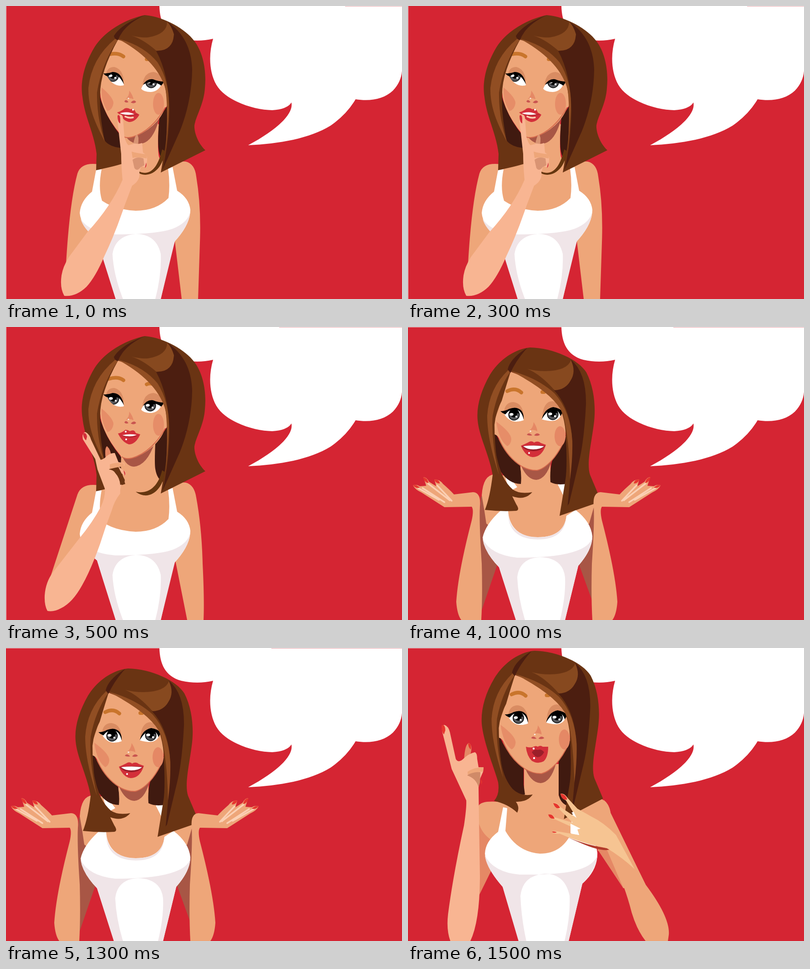
Write an HTML page that moves like this. It is 870 px wide and 644 px high and loops after 2 s.

```html
<!DOCTYPE html>
<html lang="en">
<head>
<meta charset="utf-8">
<title>Thinking woman</title>
<style>
html, body { margin: 0; width: 100%; height: 100%; overflow: hidden; background: #d52533; }
svg { display: block; width: 100%; height: 100%; }
.pose { visibility: hidden; animation: show 2s step-end infinite; animation-delay: calc(var(--i) * .5s - 2s); }
@keyframes show { 0% { visibility: visible; } 25%, 100% { visibility: hidden; } }
.white { fill: #fff; }
.shade { fill: #f0e5e8; }
.skin { fill: #eea679; }
.pale { fill: #f8b592; }
.cream { fill: #f6c492; }
.blush { fill: #e58865; }
.lid { fill: #d98c62; }
.neck { fill: #a85645; }
.hair { fill: #6a3413; }
.glow { fill: #87491f; }
.lock { fill: #914e23; }
.dark { fill: #4c1e10; }
.deep { fill: #401a10; }
.red { fill: #d32f39; }
.wine { fill: #9b1f2a; }
.nail { fill: #e6352e; }
.ink { fill: #000; }
.brow { fill: none; stroke: #c9752c; stroke-width: 8; stroke-linecap: round; }
.jaw { fill: none; stroke: #d56a4d; stroke-width: 2; }
.crease { fill: none; stroke: #fbd0b4; stroke-width: 3.5; stroke-linecap: round; }
</style>
</head>
<body>
<svg viewBox="0 0 870 644" preserveAspectRatio="none">
<defs>
  <g id="iris">
    <circle r="12.5" class="ink"/><circle r="11" fill="#55565a"/>
    <circle r="6.8" cy="-1" class="ink"/>
    <path d="M-11,-3A11,11 0 0 1 11,-3Z" class="ink"/>
    <ellipse cx="-5.5" cy="-1" rx="4.2" ry="3" class="white"/><circle cx="5" cy="4" r="2.2" class="white"/>
  </g>
  <path id="al" d="M221,151Q231,147 243,148Q256,155 259,174C246,178 230,172 221,151Z"/>
  <path id="ar" d="M297,182Q303,166 319,162Q337,164 342,171Q335,188 318,189Q303,189 297,182Z"/>
  <path id="bl" d="M212,192Q223,178 242,180Q254,189 254,205Q226,215 212,192Z"/>
  <path id="br" d="M294,203Q301,183 318,179Q334,182 336,194Q328,213 294,203Z"/>
  <clipPath id="aEyes"><use href="#al"/><use href="#ar"/></clipPath>
  <clipPath id="bEyes"><use href="#bl"/><use href="#br"/></clipPath>

  <!-- tilted head -->
  <g id="faceA">
    <path class="skin" d="M246,72Q222,105 212,140Q204,170 208,200Q215,238 252,283Q264,293 286,286Q318,272 336,248Q346,235 349,223Q355,224 355,205L350,150L318,100Z"/>
    <path class="jaw" d="M254,285Q266,294 288,284Q324,268 349,224"/>
    <path class="blush" opacity=".8" d="M210,179Q237,202 236,214Q234,228 223,231Q208,208 210,179Z"/>
    <ellipse class="blush" opacity=".8" cx="335" cy="215" rx="12" ry="24"/>
    <path class="lid" d="M220,150Q222,134 238,134Q256,138 259,165ZM300,173Q303,146 324,145Q342,148 345,168Z"/>
    <path class="blush" d="M262,205Q271,199 271,186Q279,197 280,205Q271,200 262,205Z"/>
    <circle class="white" cx="269" cy="203" r="1.6" opacity=".8"/>
    <path fill="#c95550" d="M260,210Q263,203 269,211Q264,214 260,210ZM286,211Q282,204 274,212Q281,216 286,211Z"/>
    <use href="#al" class="white"/><use href="#ar" class="white"/>
  </g>
  <path id="lashA" class="ink" d="M214,148Q224,149 234,145Q254,145 259,172Q250,153 238,150Q229,149 224,155Q217,153 214,148ZM301,173Q310,159 323,161Q334,166 348,166L341,175Q323,161 301,173Z"/>
  <g id="hairA">
    <path class="hair" d="M305,20C265,28 215,55 193,93C170,132 163,170 168,200C173,245 194,280 199,325L198,361Q240,352 262,345Q255,325 252,305Q215,290 207,200Q204,150 246,74Z"/>
    <path class="deep" d="M204,190Q215,240 253,286L252,312Q227,309 217,296Q203,250 204,190Z"/>
    <path class="lock" d="M240,72Q188,115 181,180C180,230 203,270 217,298Q197,220 208,160Q218,115 246,74Z"/>
    <path class="hair" d="M246,74Q209,130 200,190Q199,245 217,298Q204,235 207,190Q205,140 246,74Z"/>
    <path class="hair" d="M246,74Q305,92 331,128Q354,170 355,230Q355,290 346,330L340,366L438,317C420,300 413,275 414,262C418,240 435,215 437,180C441,140 432,100 413,76C395,52 350,24 305,20Q255,42 238,68Z"/>
    <path class="dark" d="M355,35Q407,70 409,140Q408,210 382,275L344,360Q358,300 359,230Q358,150 330,99Q372,95 368,60Z"/>
    <path class="glow" d="M275,65Q300,72 330,98Q366,100 369,62Q363,42 354,35Q354,62 312,69Q295,70 275,65Z"/>
    <path class="lock" d="M246,72Q302,86 333,124Q359,165 358,222Q356,275 350,325Q357,240 351,185Q334,120 246,72Z"/>
    <path class="dark" d="M305,20Q252,40 237,66Q239,74 246,75Q258,42 305,20Z"/>
  </g>
  <path id="shirtA" class="white" d="M198,360L189,408Q164,428 162,455Q165,485 200,513L213,555L241,644H340L366,530L371,517Q405,480 405,448Q402,422 376,406L366,354L356,356Q361,392 357,422Q330,450 285,450Q240,448 211,428Q202,400 210,359Z"/>
  <path id="shadeA" class="shade" d="M164,468Q182,497 240,502Q330,502 365,490Q397,478 404,455Q402,483 371,517L340,644H328Q342,590 340,545Q330,501 285,501Q240,505 234,545Q236,590 257,644H241L200,513Q170,490 164,468Z"/>
  <path id="chestA" class="skin" d="M252,270L300,245H334V325Q337,345 366,345L374,420L330,465H230L190,425L205,348L252,330Z"/>

  <!-- upright head -->
  <g id="faceB">
    <path class="neck" d="M245,295Q258,335 282,336Q304,334 315,295Z"/>
    <path class="skin" d="M225,98Q213,135 205,160Q190,188 188,212L190,236Q198,238 201,248Q217,285 248,305Q268,316 284,315Q302,311 322,286Q340,262 346,240V190L325,135Z"/>
    <path class="jaw" d="M200,246Q217,285 248,305Q266,316 284,315Q302,311 322,286Q340,262 346,240"/>
    <path class="blush" opacity=".8" d="M194,208Q227,232 227,247Q226,258 218,262Q199,248 194,208Z"/>
    <ellipse class="blush" cx="334" cy="240" rx="12" ry="22"/>
    <path class="lid" d="M211,185Q214,165 232,165Q252,168 254,195ZM295,198Q297,164 317,163Q331,165 336,185Z"/>
    <path class="blush" d="M266,228Q275,222 276,209Q284,221 284,229Q275,224 266,228Z"/>
    <circle class="white" cx="269" cy="229" r="1.8" opacity=".8"/>
    <path fill="#c95550" d="M261,237Q265,230 273,238Q267,240 261,237ZM290,237Q284,230 277,238Q284,241 290,237Z"/>
    <path class="brow" d="M218,141Q236,132 249,144M295,143H299"/>
    <use href="#bl" class="white"/><use href="#br" class="white"/>
    <g clip-path="url(#bEyes)"><use href="#iris" x="233" y="193"/><use href="#iris" x="318" y="192"/></g>
    <path class="ink" d="M203,185Q214,185 222,180Q240,173 250,185Q255,194 254,203Q250,185 238,181Q222,180 214,192Q208,190 203,185ZM294,203Q299,180 319,176Q334,178 340,187L335,196Q331,182 319,181Q304,184 294,203Z"/>
  </g>
  <g id="hairB">
    <path class="hair" d="M225,98Q290,122 320,152Q346,190 347,245Q350,310 346,335L333,415L419,370L400,325C392,300 402,260 408,215C413,180 410,135 392,100C375,72 320,46 268,45Q230,65 219,92Z"/>
    <path class="dark" d="M358,72Q392,100 391,170Q387,250 376,295L349,408Q361,300 360,240Q355,175 320,138Q360,130 363,95Z"/>
    <path class="glow" d="M262,92Q290,103 322,139Q346,138 357,118Q370,98 358,73Q350,96 302,97Q280,97 262,92Z"/>
    <path class="lock" d="M225,96Q285,112 322,146Q357,185 361,250Q362,290 356,335Q354,240 340,190Q320,145 225,96Z"/>
    <path class="dark" d="M262,46Q225,68 219,93L225,101Q238,72 262,46Z"/>
  </g>
  <g id="strandB">
    <path class="lock" d="M220,95Q178,135 174,195C174,240 188,290 200,325Q183,245 190,205Q206,160 225,100Z"/>
    <path class="hair" d="M225,98Q196,140 186,195Q182,250 200,325Q190,265 190,215Q193,185 206,162Z"/>
  </g>

  <g id="palmArm">
    <path class="skin" d="M140,395Q145,402 140,425Q110,540 106,604Q108,632 117,644H161Q164,590 162,520Q156,430 158,395Q161,364 143,363L101,368Q92,358 77,345Q70,335 58,335L62,350L46,340Q41,330 34,330L40,349L26,350Q18,345 11,348Q15,357 30,364L80,396Z"/>
    <path class="crease" d="M32,354L80,385M44,344L92,381M64,348L96,382M22,354L68,380"/>
    <path class="nail" d="M11,348Q18,345 26,353Q18,356 11,348ZM33,330Q43,331 45,343Q36,342 33,330ZM58,335Q69,335 70,344Q60,344 58,335Z"/>
  </g>
</defs>

<rect width="870" height="644" fill="#d52533"/>
<path class="white" d="M337,0C338,34 349,62 385,72Q420,80 455,72C445,105 446,145 462,173C482,208 545,229 585,229Q618,227 627,212C633,238 592,274 532,306C600,303 668,291 713,263Q749,238 768,205C800,210 830,205 850,186Q868,167 870,143V0Z"/>

<g class="pose" style="--i:0">
  <path d="M.5,0V644M745,.5H870" stroke="#eda6ac"/>
  <path class="skin" d="M205,348Q165,342 157,368Q140,430 132,565L190,490L225,400ZM356,345Q380,340 395,342Q415,347 418,375Q429,440 426,520L422,644H386L371,517L360,420Z"/>
  <use href="#chestA"/><path class="skin" d="M320,260H336Q331,320 338,340H320Z"/>
  <use href="#shirtA"/><use href="#shadeA"/>
  <path class="neck" d="M262,285Q275,306 300,302Q325,295 337,245Z"/>
  <path class="deep" d="M354,220L337,246Q332,300 336,320Q340,338 346,340Q356,290 354,220Z"/>
  <use href="#faceA"/>
  <g clip-path="url(#aEyes)"><use href="#iris" x="235" y="154"/><use href="#iris" x="319" y="168"/></g>
  <use href="#lashA"/>
  <path class="brow" d="M228,106Q246,102 258,111M309,117H312"/>
  <path class="red" d="M244,234Q254,231 261,225Q268,223 273,227Q282,224 285,234L293,239Q284,255 270,255Q258,252 253,241Z"/>
  <path class="white" d="M250,236Q268,230 282,238Q266,241 250,236Z"/>
  <path class="wine" d="M247,236Q266,243 292,237Q270,245 247,236Z"/>
  <path class="crease" d="M262,243Q270,247 279,245"/><circle class="white" cx="279" cy="228" r="2"/>
  <use href="#hairA"/>
  <path fill="#65360f" d="M293,364C317,374 334,355 343,315L348,318C348,353 320,380 293,368Z"/>
  <path class="pale" d="M128,637Q118,620 122,592Q125,573 138,552L178,498Q232,439 256,382Q253,350 253,325L246,262Q243,242 250,238Q257,239 257,247L260,287Q264,302 269,306L280,303Q284,283 288,283Q292,287 290,304L299,301L301,322L309,328Q312,341 307,355L297,352L293,365Q296,383 277,395L260,440Q240,500 216,550Q197,595 177,617Q153,640 128,637Z"/>
  <path fill="#d99473" d="M280,302Q284,282 288,283Q293,288 290,303ZM278,338Q288,330 302,335L304,350L296,354Q288,365 282,356Z"/>
  <path class="skin" d="M276,320Q290,324 310,326L309,335Q290,331 278,334Z"/>
  <path class="red" d="M245,241Q250,237 251,247V258Q245,256 245,241ZM308,344Q310,353 305,356Z"/>
</g>

<g class="pose" style="--i:1">
  <path d="M.5,0V644M600,.5H870" stroke="#eda6ac"/>
  <path class="skin" d="M205,348Q166,342 157,368L98,548L160,470L225,400ZM356,345Q380,340 395,342Q414,347 418,375Q430,440 432,520Q436,600 434,644H398L372,513L360,420Z"/>
  <use href="#chestA"/><use href="#shirtA"/><use href="#shadeA"/>
  <path class="neck" d="M255,283Q264,306 281,307Q311,304 328,250Z"/>
  <path class="deep" d="M354,220L328,257Q326,300 328,312Q332,336 346,340Q356,290 354,220Z"/>
  <use href="#faceA"/>
  <g clip-path="url(#aEyes)"><use href="#iris" x="236" y="158"/><use href="#iris" x="317" y="173"/></g>
  <use href="#lashA"/>
  <path class="brow" d="M226,114Q246,108 258,117M309,126Q317,122 326,127"/>
  <path class="red" d="M246,234Q256,232 262,226Q268,226 272,229Q282,224 285,233L295,236Q285,258 270,258Q256,254 246,234Z"/>
  <path class="white" d="M255,238Q270,234 287,237Q274,243 255,238Z"/>
  <path class="wine" d="M248,235Q269,246 294,237Q271,249 248,235Z"/>
  <circle class="white" cx="263" cy="230" r="2"/><circle class="white" cx="264" cy="247" r="2"/>
  <use href="#hairA"/>
  <path fill="#65360f" d="M285,362C312,368 334,352 343,315L348,318C348,353 316,386 285,362Z"/>
  <path class="blush" d="M219,290Q216,265 222,262Q231,270 231,286Z"/>
  <path class="pale" d="M91,624Q84,612 85,590Q87,560 104,538L160,466Q190,430 209,394Q219,372 217,355L201,313L196,290L169,247Q166,232 175,231Q184,236 187,248L208,292Q216,290 222,283Q231,276 239,277L247,297L260,299V305L246,306L262,318L263,327L250,320L256,342Q250,352 251,366Q238,382 232,404Q218,440 207,476Q186,535 167,568Q146,606 121,618Q105,627 91,624Z"/>
  <path class="hair" d="M226,313Q239,305 247,308L261,336Q261,345 251,347Q250,332 240,321Q236,314 226,313Z"/>
  <path class="skin" d="M228,302Q243,296 259,300V306Q244,308 228,312Z"/>
  <path class="red" d="M169,234Q176,230 178,241L176,249Q170,245 169,234ZM258,315Q264,320 261,327Z"/>
</g>

<g class="pose" style="--i:2">
  <path d="M0,.5H337M583,.5H870" stroke="#e9a0a6"/>
  <path class="neck" d="M160,372L205,400L197,520L162,622L156,430ZM408,380L370,400L375,520L404,600L411,430Z"/>
  <path class="skin" d="M247,290V330L190,324Q165,325 162,370L168,405L172,432L230,475H340L398,432L410,390Q414,335 395,328L313,330V290Z"/>
  <path class="white" d="M214,330L228,336L240,352L222,362ZM348,332L329,346L342,372Z"/>
  <path class="white" d="M203,404Q170,434 164,463Q168,495 200,528L237,644H345L374,525Q405,490 405,460Q402,428 368,402L348,415C345,445 325,462 285,462C245,462 222,440 220,404Z"/>
  <path class="shade" d="M220,410C222,440 245,462 285,462C325,462 345,445 348,415C346,450 325,467 285,467C242,467 220,445 220,410Z"/>
  <path class="shade" d="M164,466Q182,501 240,507Q330,507 370,492Q399,482 405,463Q402,492 374,525L345,644H334Q347,590 345,550Q340,507 290,506Q245,508 240,550Q242,595 257,644H237L200,528Q168,495 164,466Z"/>
  <path class="deep" d="M190,225Q205,270 246,304Q250,325 248,345Q222,345 204,318Q187,275 190,225ZM348,235Q336,270 317,293Q311,315 313,341Q328,349 352,344Z"/>
  <use href="#faceB"/>
  <path class="red" d="M248,261Q260,256 267,252Q273,250 277,254Q285,249 292,255L303,259Q294,286 274,286Q258,285 248,261Z"/>
  <path class="wine" d="M250,262Q275,258 301,261Q293,273 275,273Q258,272 250,262Z"/>
  <path class="white" d="M253,262Q276,259 299,262Q291,269 275,269Q261,269 253,262Z"/>
  <circle class="white" cx="266" cy="277" r="2"/>
  <path class="hair" d="M268,45C235,48 200,72 180,105C160,140 150,175 153,205C156,240 178,280 186,325Q180,375 169,402Q205,406 238,404Q246,402 238,390L229,372Q257,382 273,363Q245,368 230,357Q205,335 196,290Q188,260 189,225Q188,200 205,160L225,98Z"/>
  <use href="#strandB"/>
  <use href="#hairB"/>
  <path class="hair" d="M333,415L411,388L421,366L360,380Z"/>
  <use href="#palmArm"/>
  <use href="#palmArm" transform="matrix(-1 0 0 1 566 0)"/>
</g>

<g class="pose" style="--i:3">
  <path d="M0,.5H337" stroke="#e9a0a6"/>
  <path class="skin" d="M255,255V322L200,338Q160,335 155,347V460H190L230,475H340L400,430L425,440L445,362Q442,340 425,332L331,325V255Z"/>
  <path class="blush" d="M155,383Q162,408 183,422L185,485L156,544ZM443,360L522,520L498,490L416,445Q442,400 443,360ZM416,442L440,446L473,528Z"/>
  <path class="skin" d="M430,334Q441,342 445,362L522,520L473,528L425,415Z"/>
  <path class="white" d="M209,350L198,404Q170,425 169,452Q172,484 208,525L243,644H353L383,518Q417,488 416,450Q412,418 385,403L366,352L357,358L361,402Q340,452 290,452Q240,448 214,402L218,352Z"/>
  <path class="shade" d="M169,456Q188,493 245,498Q340,499 375,487Q408,477 416,456Q412,490 383,518L353,644H344Q357,590 355,545Q345,496 300,496Q252,500 247,545Q249,595 260,644H243L208,525Q172,484 169,456Z"/>
  <path class="deep" d="M200,190Q215,232 254,264V300L257,322Q232,330 212,293Q196,245 200,190ZM357,195Q346,230 331,248V322Q335,345 360,350Z"/>
  <g transform="translate(9.5 -39)"><use href="#faceB"/></g>
  <path class="red" d="M259,217Q270,220 276,217Q281,214 285,217Q291,213 296,217L308,217Q308,240 298,249Q285,256 272,248Q261,237 259,217Z"/>
  <path class="wine" d="M272,229Q278,222 285,224Q293,221 299,229Q293,240 285,240Q278,239 272,229Z"/>
  <circle class="white" cx="276" cy="221" r="2.2"/><circle class="white" cx="277" cy="242" r="2.2"/>
  <path class="hair" d="M277,6C244,9 210,33 190,66C169,101 160,136 162,166C165,205 190,265 198,295Q202,322 189,336Q220,343 240,362Q246,350 237,338Q262,339 274,322Q248,327 230,310Q208,285 203,240Q197,210 198,186Q198,161 215,121L235,59Z"/>
  <g transform="translate(9.5 -39)"><use href="#strandB"/><use href="#hairB"/></g>

  <path class="skin" d="M437,440L497,483L522,520Q576,592 573,630L571,644H522Q499,615 487,565Q470,505 437,440Z"/>
  <path fill="#b23a2a" d="M350,416Q395,434 436,440L444,443Q425,448 385,431Z"/>
  <path class="cream" d="M498,486L457,411Q431,384 402,370L372,353L350,329Q344,319 335,320Q336,330 347,335L370,373L334,349Q326,338 319,341Q320,350 332,354L362,384L322,372Q315,363 308,367Q311,376 324,377L372,399L376,411L328,403Q319,401 316,405Q321,409 333,408L352,416Q398,433 437,440Q470,460 498,486Z"/>
  <path class="white" d="M359,362L364,360L370,373ZM357,386L379,397L372,399L376,411L357,407Z"/>
  <path class="nail" d="M335,320Q346,321 350,333Q338,336 335,320ZM319,341Q328,340 334,351Q324,356 319,341ZM308,366Q318,364 322,375Q311,377 308,366ZM316,404Q321,402 327,405Q320,408 316,404Z"/>

  <path class="blush" d="M123,247Q125,210 134,209Q143,214 137,234Z"/>
  <path class="pale" d="M93,644Q84,620 88,585Q99,500 123,390Q129,350 128,335L96,266L76,187Q72,170 80,169Q89,172 92,185L105,244Q110,253 120,245Q133,232 147,229Q152,231 152,244L155,262L166,262L165,272L158,288L155,306L156,380L158,500Q158,600 137,644Z"/>
  <path fill="#d08a68" d="M130,280Q143,270 159,273L158,296L155,306Q150,287 130,280Z"/>
  <path class="skin" d="M131,272Q145,262 166,262L165,272Q148,271 131,278Z"/>
  <path class="nail" d="M74,170Q82,167 82,181L79,190Q73,184 74,170ZM132,210Q140,208 138,223Q133,220 132,210ZM160,289Q165,294 161,300Z"/>
</g>
</svg>
</body>
</html>
```
